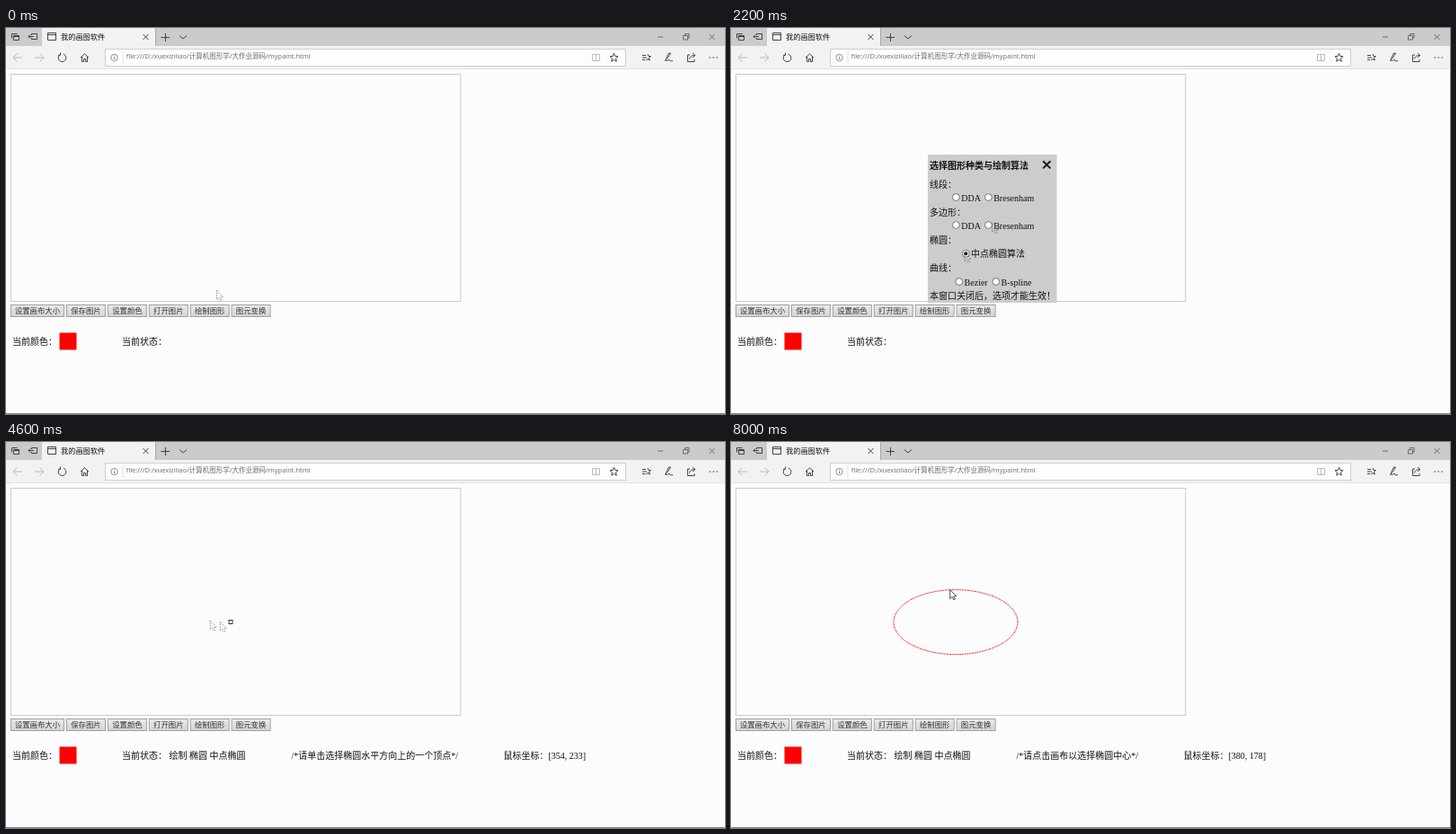
Recreate the animation shown at these times as an HTML page. Size 800 by 430 pixels, loop 8.2 s.

```html
<!DOCTYPE html>
<html lang="zh-CN">
<head>
<meta charset="utf-8">
<title>我的画图软件</title>
<style>
  html, body { margin: 0; width: 100%; height: 100%; overflow: hidden; background: #fcfcfc; }
  svg { display: block; width: 800px; height: 430px; }
  text { white-space: pre; fill: #111; }
  .page text { font: 10px 'Liberation Serif', 'Noto Sans CJK SC', 'Noto Sans CJK', serif; }
  .page .button { font: 8.4px 'Noto Sans CJK SC', 'Noto Sans CJK', sans-serif; text-anchor: middle; fill: #333; }
  .page .bold { font-weight: bold; }
  .chrome text { font: 7.5px 'Open Sans', 'Noto Sans CJK SC', 'Noto Sans CJK', sans-serif; }
  .chrome .tab { font-size: 8.2px; }
  .icon { fill: none; stroke: #333; stroke-width: .9; }
  .faint { stroke: #b4b4b4; }
  .thin { stroke: #555; stroke-width: .8; }
</style>
</head>
<body>
<svg viewBox="0 0 800 430">
  <defs>
    <linearGradient id="face" x2="0" y2="1">
      <stop stop-color="#eaeaea"/><stop offset="1" stop-color="#d4d4d4"/>
    </linearGradient>
    <path id="arrow" d="M0 0V10L2.4 7.8L4 11.2L5.6 10.5L4.1 7.2H7.2Z"/>
  </defs>
  <rect width="800" height="430" fill="#fcfcfc"/>
  <path d="M0 429.5H800" stroke="#8a8a8a"/>

  <g class="chrome">
    <rect width="800" height="20" fill="#cbcbcb"/>
    <rect x="40" width="126" height="20" fill="#f2f2f2"/>
    <path d="M166.5 0V20" stroke="#a8a8a8"/>
    <rect y="20" width="800" height="26" fill="#f2f2f2"/>
    <path d="M0 45.5H800" stroke="#e2e2e2"/>
    <rect x="110.5" y="23.5" width="579" height="19" fill="#fdfdfd" stroke="#cfcfcf"/>
    <text class="tab" x="61" y="13">我的画图软件</text>
    <text x="133.7" y="34.3" style="fill:#6c6c6c">file:///D:/xuexiziliao/计算机图形学/大作业源码/mypaint.html</text>
    <g class="icon">
      <path d="M6.5 11.5V6.5H12.5M8.5 8.5H14.5V13.5H8.5ZM8.5 9.5H14.5"/>
      <path d="M28.5 6.5H34.5V12.5H28.5V11M28.5 8V6.5M25 9.5H31M27 7.5L25 9.5L27 11.5"/>
      <path d="M46.5 5.5H55.5V13.5H46.5ZM46.5 7.5H55.5"/>
      <path d="M152.5 7L158.5 13M158.5 7L152.5 13M172.5 10.5H182M177.5 6V15M193 8.5L197 12L201 8.5"/>
      <path class="thin" d="M725 10H731M753.5 8.5H758.5V13H753.5ZM755.5 8V6.5H760V11H759M782.5 7L788.5 13M788.5 7L782.5 13"/>
      <path class="faint" d="M18 33H8M12.5 28.5L8 33L12.5 37.5M32 33H42M37.5 28.5L42 33L37.5 37.5"/>
      <path d="M130 26V40" stroke="#ddd"/>
      <path d="M60 29.8A4.3 4.3 0 1 0 64 29.2M60.5 27.5V30.3H58"/>
      <path d="M83 33L87.5 28.8L92 33M84.5 32V37.5H86.5V34.5H88.5V37.5H90.5V32"/>
      <g stroke="#777"><circle cx="120.5" cy="33" r="3.7" stroke-width=".8"/><path d="M120.5 32.5V35M120.5 30.8V31.6"/></g>
      <path class="faint" d="M656.5 30V37M652.5 29.5H656.5H660.5V36.5H652.5Z"/>
      <path d="M676.5 28.3L677.8 31.4L681 31.7L678.5 33.9L679.3 37.2L676.5 35.4L673.7 37.2L674.5 33.9L672 31.7L675.2 31.4Z"/>
      <path d="M708 30.5H712M708 33H713M708 35.5H711M714 29L715 31.5H717.5L715.5 33.2L716.3 36L714 34.5L712 36"/>
      <path d="M733 36.5C736 34 738 31 739.5 28L737 28.5L734.5 34.5C733 38 737 36 738 35C738 37 740 37 742 36.5"/>
      <path d="M761 30H758.5V37.5H766V35M760.5 34.5C761 31.5 763 30.5 766.5 30.5M764 28L766.8 30.5L764 33"/>
      <path d="M782.5 33H784M786.5 33H788M790.5 33H792" stroke-width="1.2"/>
    </g>
  </g>

  <g class="page">
    <rect x="5.5" y="51.5" width="500.3" height="253" fill="none" stroke="#ccc"/>
    <g id="buttons"></g>
    <text x="7" y="353">当前颜色：</text>
    <rect x="59.5" y="339.5" width="19" height="19" fill="#f00"/>
    <text x="129" y="353">当前状态：</text>
    <text id="state" x="181.5" y="353">绘制 椭圆 中点椭圆</text>
    <text id="hint" x="317.5" y="353"></text>
    <text id="coords" y="353"></text>

    <rect id="centre" x="248" y="198.5" width="4" height="4" fill="none" stroke="#222" stroke-width=".9"/>
    <path id="vertices" d="M181.2 198V203M318.6 198V203" stroke="#222"/>
    <ellipse id="ellipse" cx="250" cy="200.6" rx="69" ry="36" fill="none" stroke="#f00" stroke-width=".9" stroke-dasharray="2 .8"/>

    <g id="dialog">
      <rect x="219" y="141" width="143.5" height="165" fill="#ccc"/>
      <text class="bold" x="221" y="157">选择图形种类与绘制算法</text>
      <rect id="closeHover" x="342.5" y="143.5" width="18" height="18" fill="#e81f24" stroke="#222" stroke-width=".8" stroke-dasharray="1 1"/>
      <path d="M347.2 148.2L355.4 156.4M355.4 148.2L347.2 156.4" stroke="#1a1a1a" stroke-width="2"/>
      <g id="options"></g>
      <circle id="checked" cx="261.3" cy="251.3" r="2.1" fill="#222"/>
    </g>
  </g>

  <use id="trail" href="#arrow"/>
  <use id="cursor" href="#arrow"/>
</svg>

<script>
const LOOP = 8200, STEP = 200, SCALE = 0.627;
const OPEN = 800, CHECK = 2000, HOVER = 2600, CLOSE = 3200;
const CENTRE = 4000, VERTEX = 5600, DONE = 7600;
const $ = id => document.getElementById(id);

function add(parent, tag, attrs, content = '') {
  const node = document.createElementNS('http://www.w3.org/2000/svg', tag);
  for (const key in attrs) node.setAttribute(key, attrs[key]);
  node.textContent = content;
  parent.append(node);
}

function addButton(label, x, width) {
  add($('buttons'), 'rect', { x: x + .5, y: 308.5, width: width - 1, height: 13, fill: 'url(#face)', stroke: '#a0a0a0' });
  add($('buttons'), 'text', { class: 'button', x: x + width / 2, y: 318.4 }, label);
}
addButton('设置画布大小', 5, 60);
['保存图片', '设置颜色', '打开图片', '绘制图形', '图元变换'].forEach((label, i) => addButton(label, 67 + 45.9 * i, 44));

function addOption(label, x, y) {
  add($('options'), 'circle', { cx: x, cy: y, r: 3.9, fill: '#fff', stroke: '#555', 'stroke-width': .8 });
  add($('options'), 'text', { x: x + 5.8, y: y + 4 }, label);
}
[['线段：', 178], ['多边形：', 208.6], ['椭圆：', 239.6], ['曲线：', 271.2], ['本窗口关闭后，选项才能生效！', 302]]
  .forEach(([label, y]) => add($('options'), 'text', { x: 221, y }, label));
for (const y of [188.6, 219.5]) {
  addOption('DDA', 250.4, y);
  addOption('Bresenham', 286.4, y);
}
addOption('中点椭圆算法', 261.3, 251.3);
addOption('Bezier', 253.8, 282.6);
addOption('B-spline', 294.8, 282.6);

// time, x, y of the pointer tip
const path = [
  [0, 234.5, 292.5], [400, 233, 309], [800, 233, 309], [1200, 244, 284], [1400, 251, 276],
  [1800, 260, 250], [2000, 260, 250], [2600, 352, 153], [3200, 352, 153], [3400, 347.8, 155.2],
  [3800, 250, 200], [4200, 250, 201], [4400, 238.3, 200.6], [4600, 227.2, 199], [5400, 181, 200], [5600, 181, 200],
  [6400, 243.7, 173.4], [7000, 243.7, 164.6], [LOOP, 243.7, 164.6]
];

function pointerAt(t) {
  const i = path.findIndex(key => key[0] > t);
  const [t0, x0, y0] = path[i - 1], [t1, x1, y1] = path[i];
  const k = (t - t0) / (t1 - t0);
  return [x0 + (x1 - x0) * k, y0 + (y1 - y0) * k];
}

const show = (id, on) => $(id).setAttribute('visibility', on ? 'visible' : 'hidden');

function drawPointer(id, [x, y], dotted) {
  const style = dotted
    ? { fill: 'none', stroke: '#444', 'stroke-width': .8, 'stroke-dasharray': '1 1.6' }
    : { fill: '#fff', stroke: '#222', 'stroke-width': .8, 'stroke-dasharray': 'none' };
  style.transform = `translate(${x} ${y})`;
  for (const key in style) $(id).setAttribute(key, style[key]);
}

function hintAt(t) {
  if (t < CLOSE) return '';
  if (t < CENTRE || t >= DONE) return '/*请点击画布以选择椭圆中心*/';
  return `/*请单击选择椭圆${t < VERTEX ? '水平' : '垂直'}方向上的一个顶点*/`;
}

function render(time) {
  const t = Math.floor(time % LOOP / STEP) * STEP;
  const tip = pointerAt(t), last = pointerAt(Math.max(0, t - STEP));
  const moving = t === 0 || Math.hypot(tip[0] - last[0], tip[1] - last[1]) > 1;
  const longHint = t >= CENTRE && t < DONE;

  show('dialog', t >= OPEN && t < CLOSE);
  $('checked').style.display = t >= CHECK ? '' : 'none';
  $('closeHover').style.display = t >= HOVER ? '' : 'none';
  show('state', t >= CLOSE);
  $('hint').textContent = hintAt(t);

  const u = Math.round((tip[0] - 5.5) / SCALE), v = Math.round((tip[1] - 53) / SCALE);
  $('coords').textContent = t > CLOSE ? `鼠标坐标：[${u}, ${v}]` : '';
  $('coords').setAttribute('x', longHint ? 553.5 : 503.5);
  $('coords').setAttribute('opacity', t === CLOSE + STEP ? .6 : 1);

  show('centre', longHint);
  show('vertices', t >= VERTEX && t < DONE);
  show('ellipse', t >= DONE);

  drawPointer('cursor', tip, moving);
  drawPointer('trail', last, true);
  show('trail', moving && t > 0 && t < VERTEX);
}

const start = performance.now();
function tick() {
  render(performance.now() - start);
  requestAnimationFrame(tick);
}
tick();
</script>
</body>
</html>
```
